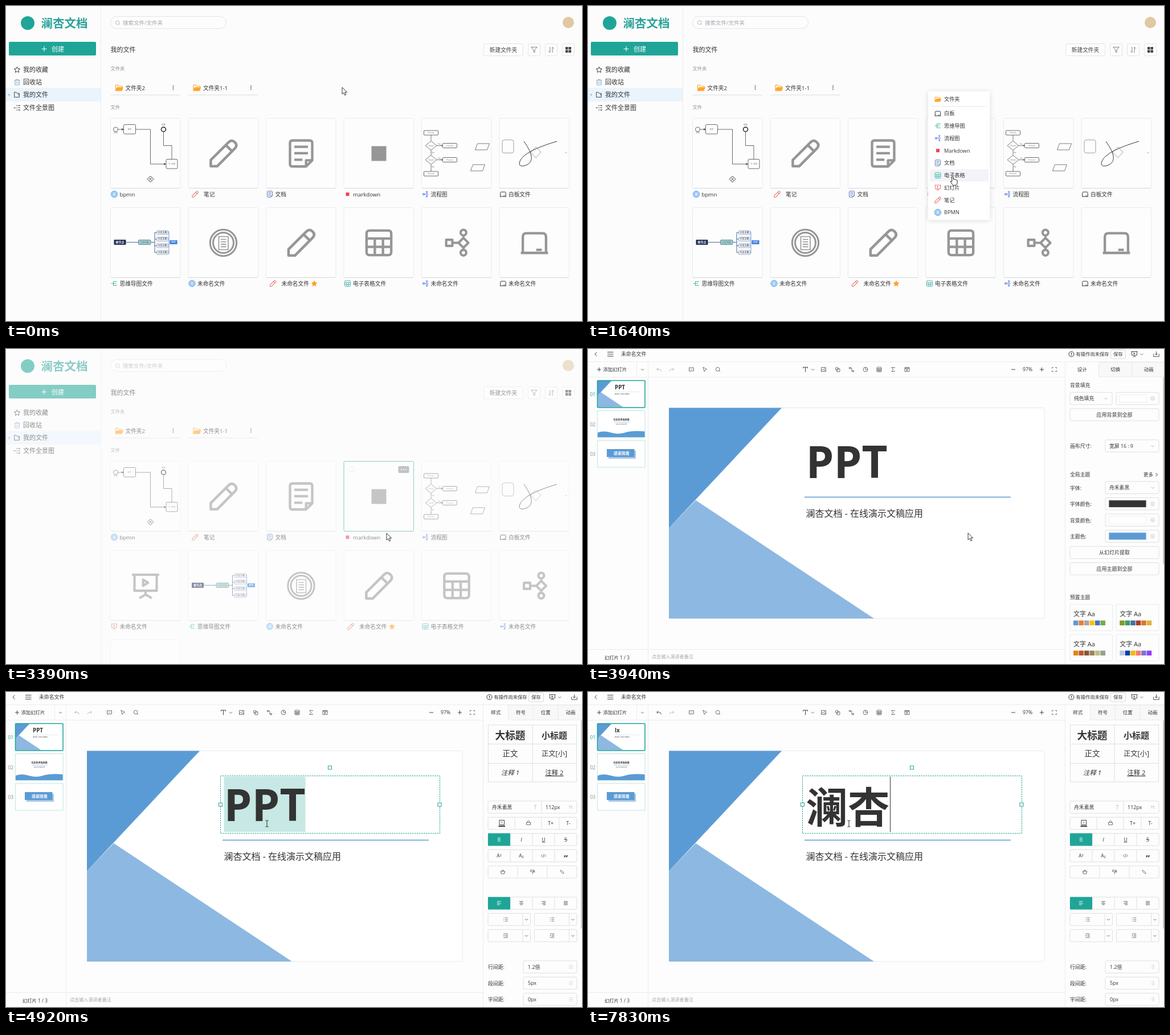
An HTML page that plays this animation: 1011 px wide and 554 px high, repeating every 8 s.

```html
<!DOCTYPE html>
<html lang="zh-CN">
<head>
<meta charset="utf-8">
<title>澜杏文档</title>
<style>
  html, body { margin: 0; width: 100%; height: 100%; overflow: hidden; background: #fcfcfc; }
  svg { display: block; width: 1011px; height: 554px; }
  text { font-family: "Open Sans", "Noto Sans CJK SC", sans-serif; white-space: pre; }
</style>
</head>
<body>
<svg id="stage" viewBox="0 0 1011 554"></svg>
<script>
const TEAL = '#1fa597', INK = '#333', GREY = '#969696', PALE = '#e2e4e8', BLUE = '#5b9bd5';
const LOOP = 8000;

// Drawing helpers: every one returns SVG markup. Text is placed by its vertical centre.
const text = (x, cy, s, size, color = INK, extra = '') =>
  `<text x="${x}" y="${cy + size * .37}" font-size="${size}" fill="${color}" ${extra}>${s}</text>`;
const mid = (x, cy, s, size, color, extra = '') => text(x, cy, s, size, color, 'text-anchor="middle" ' + extra);
const rect = (x, y, w, h, fill = 'none', stroke = 'none', r = 0, extra = '') =>
  `<rect x="${x}" y="${y}" width="${w}" height="${h}" rx="${r}" fill="${fill}" stroke="${stroke}" ${extra}/>`;
const path = (d, stroke = INK, w = 1, fill = 'none', extra = '') =>
  `<path d="${d}" stroke="${stroke}" stroke-width="${w}" fill="${fill}" ${extra}/>`;
const circle = (x, y, r, fill = 'none', stroke = 'none', w = 1) =>
  `<circle cx="${x}" cy="${y}" r="${r}" fill="${fill}" stroke="${stroke}" stroke-width="${w}"/>`;
const move = (x, y, body) => `<g transform="translate(${x} ${y})">${body}</g>`;
const layer = (id, body) => `<g id="${id}">${body}</g>`;
const box = (x, cy, w, h = 21.5) => rect(x, cy - h / 2, w, h, '#fdfdfd', '#dcdfe3', 2);
const chevron = (x, y, c = '#666') => path(`M${x - 2.5} ${y - 1}l2.5 2.5l2.5-2.5`, c, .9);

// Icons live in a 24-unit box: path, colour, line width (0 means filled).
const ring = (x, y, r) => `M${x - r} ${y}a${r} ${r} 0 1 0 ${2 * r} 0a${r} ${r} 0 1 0 ${-2 * r} 0`;
const STAR = 'M12 1.5l3.2 6.8l7.3 1l-5.3 5.2l1.3 7.4L12 18.3l-6.5 3.6l1.3-7.4L1.5 9.3l7.3-1z';
const ICONS = {
  pen: ['M1.8 17.2V22.3H7L21.5 7.7Q23.7 5.2 21.3 2.8T16.5 2.6ZM14 5.1l5 5', '#e57368', 2.1],
  doc: ['M5 1.4H19Q21 1.4 21 3.4V17.5L16 22.5H5Q3 22.5 3 20.5V3.4Q3 1.4 5 1.4ZM6.5 6.5h11M6.5 11.7h11M6.5 17h6.5M16 22V17.5H20.5', '#5b7fb5', 2],
  md: ['M6 6h12v12H6z', '#f04455', 0],
  bpmn: [ring(12, 12, 10.7) + ring(12, 12, 8.3), '#5f9fe4', 1.4],
  table: ['M4.5 2h15q2.5 0 2.5 2.5v15q0 2.500-2.500 2.500h-15q-2.500 0-2.500-2.500v-15q0-2.500 2.500-2.500zM2 8.500h20M2 15.300h20M8.700 8.500V22M15.300 8.500V22', '#4fb8b0', 2],
  flow: ['M3.5 9.5h5v5h-5zM8.5 12h5M17.5 8l4 4l-4 4l-4-4zM17.5 6.600V8M17.500 16v1.400' + ring(17.5, 3.700, 2.300) + ring(17.500, 20, 2.300), '#4a6ef0'],
  board: ['M2.6 20V7.2q0-3 3-3h12.800q3 0 3 3V20M1 20.2h22M13.500 17.700h4.500', '#333', 2],
  mind: ['M1 12h7M9 4v16M9 5h13M9 12h10M9 19h13', '#3dbb85'],
  slide: ['M1 3h22M3 3v13h18V3M12 16v3M7 22l5-3l5 3M10 7v5l4-2.5z', '#e8706a'],
  folder: ['M1 20V5q0-2 2-2h6l2 3h9q2 0 2 2v2h2l-3 10q0 1-2 1H3q-2 0-2-1zM3 15V5h6l2 3h9v2H6z', '#ffa72b', 0],
  star: [STAR, '#222'],
  starFull: [STAR, '#ff9d2e', 0],
  trash: ['M2 5h20M8 5V2h8v3M4 5v17h16V5M9 9v9M15 9v9', '#7fa5c4'],
  dir: ['M2 21V3h7l3 4h8v14zM15 12h5', '#333'],
  tree: ['M0 12h7M10 4h3M10 12h3M10 20h3M16 4h7M16 12h7M16 20h7', '#333', 2.500],
  undo: ['M9 5L3 11l6 6M3 11h11q7 0 7 9', 'currentColor'],
  redo: ['M15 5l6 6l-6 6M21 11H10q-7 0-7 9', '#aaa'],
  note: ['M2 4h20v14H10l-4 3v-3H2zM7 11h2M11 11h2M15 11h2', '#444'],
  pointer: ['M4 2l17 9l-7 3l-4 7z', '#444'],
  search: [ring(11, 11, 8.5) + 'M17 17l5 5', '#444'],
  image: ['M2 3h20v18H2zM2 18l7-7l6 6l3-3l4 4' + ring(16, 8, 1.5), '#444'],
  shapes: ['M9 9h13v13H9z' + ring(9, 9, 6.5), '#444'],
  line: ['M2 3h5v5H2zM17 17h5v5h-5zM7 5.5h6v14h4', '#444'],
  pie: [ring(12, 12, 10) + 'M12 2v10h10', '#444'],
  sigma: ['M19 6V3H5l8 9l-8 9h14v-3', '#444'],
  media: ['M2 3h20v18H2zM2 8h20M8 3v5M16 3v5M10 11v7l5-3.5z', '#444'],
  full: ['M2 8V3h6M16 3h6v5M22 16v5h-6M8 21H2v-5', '#444'],
  save: ['M2 11v10h20V11M12 2v13M7 10l5 5l5-5', '#444'],
  palette: [ring(12, 12, 10) + 'M8 8v2M14 6v2M17 12v2M7 14l6-2v6', '#b5b8bd', 2],
  funnel: ['M2 3h20l-8 9v9l-4-2v-7z', '#555', 1.4],
  sort: ['M8 2v19l-5-5M16 22V3l5 5', '#555', 1.4],
  lock: ['M3 11h18v10H3zM7 11V7q5-8 10 0v4', '#444'],
  eraser: ['M2 9h20v5h-3v7H5v-7H2zM8 9V4h8v5', '#444'],
  brush: ['M3 3h16v7H3zM19 6h3v7H12v9', '#444'],
  link: ['M10 14L4 8q-1-5 4-4l7 7M14 10l6 6q1 5-4 4l-7-7', '#444'],
  code: ['M7 6l-6 6l6 6M17 6l6 6l-6 6M14 4l-4 16', '#444'],
  left: ['M3 4h18M3 9h11M3 14h18M3 19h11', '#444'],
  center: ['M3 4h18M7 9h10M3 14h18M7 19h10', '#444'],
  right: ['M3 4h18M10 9h11M3 14h18M10 19h11', '#444'],
  justify: ['M3 4h18M3 9h18M3 14h18M3 19h18', '#444'],
  list: ['M9 4h13M9 12h13M9 20h13M2 4h3M2 12h3M2 20h3', '#444'],
  indent: ['M2 3h20M11 9h11M11 15h11M2 21h20M2 9l5 3l-5 3', '#444'],
};
function icon(name, x, y, size = 12, color) {
  const [d, own, w = 1.9] = ICONS[name], c = color || own;
  return `<g transform="translate(${x - size / 2} ${y - size / 2}) scale(${size / 24})" stroke-linejoin="round" fill-rule="evenodd">` +
    path(d, w ? c : 'none', w, w ? 'none' : c) + '</g>';
}
const bpmnBadge = (x, y) => circle(x, y, 5.7, '#a9d0f7', '#6eaef0') + rect(x - 2.3, y - 3, 4.6, 6, '#fff', '#5f9fe4', .5, 'stroke-width=".7"') +
  path(`M${x - 1.200} ${y - 1}h2.400m-2.400 2h2.400`, '#5f9fe4', .7);
const fileIcon = (name, x, y) => name === 'bpmn' ? bpmnBadge(x, y) : icon(name, x, y, 12);
const bigIcon = name => icon(name, 61.5, 61.5, 52, GREY) +
  (name === 'bpmn' ? path('M53.5 50.500h16.500v23h-16.500zM57 55.500h9.500m-9.500 4.300h9.500m-9.500 4.300h9.500m-9.500 4.300h9.500', GREY, 1.600) : '');

// ---------- file list ----------
const DARK = '#444';
const tiny = (x, y, s) => mid(x, y, s, 3.2, '#666');
const node = (x, y, w, h, r, s) => rect(x, y, w, h, 'none', DARK, r, 'stroke-width=".8"') + tiny(x + w / 2, y + h / 2, s);
const thumbs = {
  bpmn: circle(9, 19, 4, 'none', DARK, .8) + tiny(9, 25, '开始') + path('M13 19h10M44 19H70V80H97', DARK, .8) +
    path('M20 17.500l3 1.500l-3 1.500zM94 78.500l3 1.500l-3 1.500z', DARK, .5, DARK) + node(23, 10.5, 21, 16.5, 2, '任务') +
    node(97.5, 71.5, 20, 16.5, 2, '下一任务') + path('M107.5 71V47.5H93V24', DARK, .8) +
    circle(93, 19, 4, 'none', '#222', 1.5) + tiny(93, 11, '结束') + path('M70 101l5.5 5.5l-5.5 5.5l-5.5-5.5zM68 104.5l4 4m0-4l-4 4', '#222', .9),
  flow: [[4, 21], [37, 43.5], [37, 68.5], [4, 93]].map(([x, y]) => node(x, y, 25, 8, 1, 'Process')).join('') +
    [47.5, 72.5].map(y => path(`M16.5 ${y - 8}l10 8l-10 8l-10-8zM26.5 ${y}H36M16.5 ${y + 8}v9`, DARK, .7) +
      path(`M34.500 ${y - 1}l2 1l-2 1z`, DARK, .5, DARK) + tiny(16.5, y, 'Check') + tiny(31, y - 3, 'Yes') + tiny(20, y + 12, 'No')).join('') +
    path('M16.5 29v10M16.5 89v4M98 44h21l-4 11h-21zM90 81h21l-4 11h-21z', DARK, .7),
  board: rect(5, 37.5, 20, 23, 'none', '#777', 3.5, 'stroke-width=".7"') + path('M64 50l9 9l-9 10l-9-10z', '#666', .6) +
    path('M43 40C60 64 59 75 49 81C38 86 33 83 36 75C42 60 74 48 101 40', '#333', 1) + circle(117, 60, .7, '#555'),
  mind: path('M27 60.5H49M71 60.5h6.5M82 43.5h-4.5v35H82M77.5 55H82M77.5 66.5H82', '#3b5b86', .9) +
    path('M101 42h1.5v38H101M102.5 60.5H104', '#4a86d8', .8) +
    rect(6, 56, 21, 9, '#1f3056', 'none', 1) + mid(16.5, 60.5, '根节点', 5, '#fff', 'font-weight="700"') +
    rect(49, 56.5, 21.5, 8, '#a4cccd', '#4f8b94', 1.5) + mid(59.7, 60.5, '分支主题', 3.8, '#46727a') +
    [43.5, 55, 66.5, 78.5].map(y => rect(81, y - 3.5, 20, 7, '#eef2f8', '#6f86aa', 1, 'stroke-width=".6"') + mid(91, y, '分支主题', 4, '#334')).join('') +
    rect(104, 57, 13, 7, '#3b7ddd') + mid(110.5, 60.5, '概要', 4, '#fff'),
};
const UNTITLED = '未命名文件';
const files = [
  ['bpmn', 'bpmn', 'bpmn'], ['pen', '笔记'], ['doc', '文档'], ['md', 'markdown'], ['flow', '流程图', 'flow'], ['board', '白板文件', 'board'],
  ['mind', '思维导图文件', 'mind'], ['bpmn', UNTITLED], ['pen', UNTITLED, '', true], ['table', '电子表格文件'], ['flow', UNTITLED], ['board', UNTITLED],
];
function fileCard([name, label, thumb, starred], i) {
  const indent = name === 'pen' ? 27 : 16;
  return move(183.5 + i % 6 * 136.5, 198 + Math.floor(i / 6) * 157,
    rect(0, -.5, 122.5, 123, '#fdfdfd', '#e9ebee', 2) + path('M1 122.5H121.5', '#d3d5d8') +
    (thumb ? thumbs[thumb] : bigIcon(name)) +
    fileIcon(name, name === 'pen' ? 12 : 6.5, 133) + text(indent, 133, label, 9.7) +
    (starred ? icon('starFull', 84.5, 133, 12.5) : ''));
}
const fileGrid = list => list.map(fileCard).join('');
const folderCard = (x, label) => icon('folder', x + 15, 144, 14.5) + text(x + 26, 144, label, 9.7) +
  [140.5, 143.5, 146.5].map(y => circle(x + 110, y, .9, '#555')).join('') + path(`M${x} 156.5h122.5`, '#dcdee1');
const sideRow = (name, y, s) => icon(name, 19.5, y, 11.5) + text(30, y, s, 11);
const tool = x => rect(x, 66.5, 21, 21, '#fdfdfd', PALE, 2);

const listPage =
  path('M166.5 0V554', '#ececee') + circle(38, 30, 12, TEAL) + text(61.5, 30, '澜杏文档', 20.5, '#2aa198', 'font-weight="700"') +
  rect(5, 63, 153, 24, TEAL, 'none', 2) + path('M62.5 75.5h9M67 71v9', '#fff', 1.1) + text(80, 75.5, '创建', 11, '#fff', 'font-weight="500"') +
  rect(0, 144, 166, 24, '#e9f4fd') + path('M4.5 153.5l3 2.7l-3 2.7z', 'none', 0, '#b5bac2') +
  sideRow('star', 112, '我的收藏') + sideRow('trash', 134, '回收站') + sideRow('dir', 156, '我的文件') + sideRow('tree', 179, '文件全景图') +
  rect(183.5, 18.5, 203, 21, '#fdfdfd', PALE, 10.5) + icon('search', 196, 29.5, 9.5, '#a0a3a8') + text(205, 29.5, '搜索文件/文件夹', 9.5, '#a2a5ab') +
  circle(987, 29, 10, '#e0c9a2') + text(183.5, 77, '我的文件', 11) +
  rect(838.5, 66.5, 69, 21, '#fdfdfd', PALE, 2) + mid(873, 77, '新建文件夹', 9.7, '#444') +
  tool(916.5) + tool(946.5) + tool(976.5) + icon('funnel', 927, 77, 12.5) + icon('sort', 957, 77, 12.5) +
  [982, 987.5].map(x => [72, 77.5].map(y => rect(x, y, 4.5, 4.5, '#444')).join('')).join('') +
  text(183.5, 110, '文件夹', 8.3, '#8f9399') + folderCard(183.5, '文件夹2') + folderCard(320, '文件夹1-1') + text(183.5, 178, '文件', 8.3, '#8f9399') +
  layer('gridOld', fileGrid(files)) +
  layer('gridNew', fileGrid([...files.slice(0, 6), ['slide', UNTITLED], ...files.slice(6)])) +
  layer('hover', rect(593, 197.5, 122.5, 123, 'none', '#35a79c', 2) + rect(601.5, 207.5, 9, 8, '#fff', '#dcdfe6', 1) +
    rect(688.5, 206, 19, 12, '#909294', 'none', 2) + [694, 698, 702].map(x => circle(x, 212, 1.1, '#fff')).join(''));

const menuItems = [['folder', '文件夹'], ['board', '白板'], ['mind', '思维导图'], ['flow', '流程图'], ['md', 'Markdown'],
  ['doc', '文档'], ['table', '电子表格'], ['slide', '幻灯片'], ['pen', '笔记'], ['bpmn', 'BPMN']];
const menuY = i => i ? 189 + (i - 1) * 21.75 : 164;
const menu = rect(597, 150, 108.5, 226.5, '#fff', 'none', 3, 'style="filter:drop-shadow(0 1px 4px #0002)"') +
  rect(600, 0, 103, 21.5, '#f2f4f7', 'none', 2, 'id="menuHover"') + path('M603 176.5H699', '#e6e8eb') +
  menuItems.map(([name, s], i) => fileIcon(name, 614, menuY(i)) + text(625, menuY(i), s, 9.2)).join('');

// ---------- slide editor ----------
const slideArt = path('M142 103.5H340L142 315z', 'none', 0, BLUE) + path('M142 315L189 266L502 474H142z', 'none', 0, '#8db8e2') +
  path('M380 260.5H742', BLUE, 1.5) + text(382.5, 289.5, '澜杏文档 - 在线演示文稿应用', 16);
const title = (id, s) => `<text id="${id}" x="382.5" y="227" font-size="78" font-weight="700" fill="${INK}">${s}</text>`;
const thumbFrame = (y, body) => rect(16.5, y, 83.5, 47, '#fff') + body + rect(16.5, y, 83.5, 47, 'none', '#bfe6df');
const editorIcons = [['redo', 147], ['note', 181.5], ['pointer', 205], ['search', 228], ['image', 413.5], ['shapes', 438],
  ['line', 462.5], ['pie', 487], ['table', 511], ['sigma', 535.5], ['media', 560], ['full', 818.5]];
const editorBase = rect(0, 0, 1011, 554, '#fdfdfd') + path('M0 22.5H1011M0 49.5H837M0 528.5H837M105.5 22V554M837.5 22V554M85.5 23V49', '#ebecee') +
  path('M15.5 5.5l-3.5 3.5l3.5 3.5M34 5.5h10.5M34 9h10.5M34 12.5h10.5', '#444') + text(58, 9, UNTITLED, 8.9) +
  circle(848.5, 9, 4.5, 'none', '#333') + path('M848.5 6.5v3.2M848.5 10.7v1', '#333', 1.2) + text(856.5, 9, '有操作尚未保存', 8.3) +
  rect(917.5, 1.5, 26, 15.5, '#fdfdfd', '#d8dadd', 2) + mid(930.5, 9, '保存', 8.3) + icon('slide', 959, 9, 12, '#444') + chevron(972, 9) + icon('save', 997.5, 9, 11.5) +
  path('M16 36h7M19.5 32.5v7M743 36h7M793 36h7M796.5 32.5v7', '#444') + text(26.5, 36, '添加幻灯片', 8.4) + chevron(95.5, 36) +
  layer('undo', icon('undo', 124.5, 36, 10)) + editorIcons.map(([n, x]) => icon(n, x, 36, 9.5, n === 'redo' ? '#aaa' : '#444')).join('') +
  path('M377.5 34v-2h8v2M381.5 32v8.5', '#444') + chevron(394.5, 36) + mid(771.5, 36, '97%', 8.7) +
  ['01', '02', '03'].map((s, i) => text(3.5, 80 + i * 52.5, s, 8.5, i ? '#8a8d92' : TEAL)).join('') +
  thumbFrame(55.5, `<g transform="translate(16.5 55.5) scale(.1267) translate(-142 -103.5)">${slideArt}${title('miniTitle', 'PPT')}</g>`) +
  rect(16.5, 55.5, 83.5, 47.5, 'none', TEAL, 1, 'stroke-width="1.5"') +
  thumbFrame(108.5, mid(58.5, 125, '在此处添加标题', 4, INK, 'font-weight="700"') + path('M45 128.5H73', BLUE, .5) + mid(58.5, 132, '在此处添加副标题', 2.5, '#667') +
    path('M17 147Q27 143 40 147T65 147T100 145V155H17z', 'none', 0, BLUE)) +
  thumbFrame(161, rect(36, 179, 48, 14, '#a9c9e8') + rect(33, 176, 48.5, 14, BLUE) + mid(59, 183.5, '感谢观看', 7, '#fff', 'font-weight="700"')) +
  text(29, 543, '幻灯片 1 / 3', 8.3) + text(112, 541, '点击输入演讲者备注', 8.1, '#a3a6ab') +
  rect(142.5, 103.5, 658.5, 370.5, '#fff', '#e9eaec', 3) + slideArt + rect(382.5, 149, 143, 97, '#c7e8e4', 'none', 0, 'id="selection"') + title('bigTitle', 'PPT');

const tabs = (names, w) => names.map((s, i) => (i ? rect(838 + i * w, 23, w, 26, '#f8f8f9', '#e9eaec') : '') + mid(838 + (i + .5) * w, 36, s, 8.5)).join('');
const label = (y, s) => text(846, y, s, 8.9);
const select = (x, y, w, s) => box(x, y, w) + text(x + 7, y, s, 8.8) + chevron(x + w - 11, y, '#b0b3b8');
const picker = (y, color, x = 908, w = 94) => box(x, y, w) + rect(x + 6, y - 6.5, w - 28, 13, color, '#eee') + icon('palette', 991, y, 8);
const wide = (y, s) => box(846, y, 156) + mid(924, y, s, 9);
const themes = ['#5b9bd5 #ed7d31 #a5a5a5 #ffc000 #4472c4 #70ad47', '#83992a #3c9770 #44709d #a23c33 #d97828 #deb340',
  '#e48312 #bd582c #865640 #9b8357 #c2bc80 #94a088', '#bdc8df #003fa9 #f5ba00 #ff7567 #7676d9 #923ef9'];
const scrollbar = h => rect(1009, 50, 2, h, '#cfd1d4');
const designPanel = tabs(['设计', '切换', '动画'], 58.5) + label(64, '背景填充') + select(846, 87, 74, '纯色填充') + picker(87, '#fff', 927, 75) + wide(115.5, '应用背景到全部') +
  label(171, '画布尺寸:') + select(908, 170.5, 94, '宽屏 16 : 9') + label(221, '全局主题') + text(975, 221, '更多', 8.5) + path('M996.5 218l3 3l-3 3', '#444') +
  label(244.5, '字体:') + select(908, 243.75, 94, '舟禾素黑') +
  [['字体颜色:', INK], ['背景颜色:', '#fff'], ['主题色:', BLUE]].map(([s, c], i) => label(273 + i * 28.5, s) + picker(272.25 + i * 28.5, c)).join('') +
  wide(358, '从幻灯片提取') + wide(386.5, '应用主题到全部') + label(436.5, '预置主题') +
  themes.map((row, i) => move(846 + i % 2 * 81.25, 449 + (i >> 1) * 53, rect(0, 0, 74.5, 46.5, '#fdfdfd', '#e9eaec', 1) + text(6, 17, '文字 Aa', 11) +
    row.split(' ').map((c, k) => rect(6 + k * 9.5, 28.5, 8.5, 8.5, c)).join(''))).join('') + scrollbar(328);

const cells = (y, ...splits) => box(846, y, 156) + splits.map(x => path(`M${x} ${y - 10.75}v21.5`, '#dcdfe3')).join('');
const quarters = [885, 924, 963], slot = i => 865.5 + i * 39;
const active = y => rect(846, y - 11, 39, 22, TEAL, 'none', 1);
const stylePanel = tabs(['样式', '符号', '位置', '动画'], 43.75) + rect(846.5, 58, 155, 100, '#fdfdfd', '#dcdfe3') + path('M846 91.5H1001M846 125.5H1001M924 58V158', '#dcdfe3') +
  mid(885, 76, '大标题', 17.7, INK, 'font-weight="700"') + mid(962.5, 76, '小标题', 15, INK, 'font-weight="700"') + mid(885, 108.5, '正文', 13.5) + mid(962.5, 108.5, '正文[小]', 12.3) +
  mid(885, 142, '注释 1', 11.3, INK, 'font-style="italic"') + mid(962.5, 142, '注释 2', 11.3, INK, 'text-decoration="underline"') +
  cells(202.5, 940) + text(853, 202.5, '舟禾素黑', 8.9) + mid(929, 202.5, 'T', 9, '#b0b3b8') + text(947, 202.5, '112px', 9) + mid(991, 202.5, 'Tt', 8, '#b0b3b8') +
  cells(231, 893, 940, 971) + rect(866, 225.5, 8.5, 8, 'none', '#444') + mid(870.25, 229.5, 'T', 6) + rect(864.5, 235, 11.5, 1.8, '#222') +
  icon('lock', 917, 230, 9.5) + mid(956, 231, 'T+', 9) + mid(987, 231, 'T-', 9) +
  cells(259.5, ...quarters) + active(259.5) + mid(slot(0), 259.5, 'B', 9, '#fff') + mid(slot(1), 259.5, 'I', 9, INK, 'font-style="italic"') +
  mid(slot(2), 259.5, 'U', 8.5, INK, 'text-decoration="underline"') + mid(slot(3), 259.5, 'S', 9, INK, 'text-decoration="line-through"') +
  cells(288, ...quarters) + mid(slot(0), 288, 'A²', 8.5) + mid(slot(1), 288, 'A₂', 8.5) + icon('code', slot(2), 288, 9) + mid(slot(3), 291, '“', 15, INK, 'font-weight="700"') +
  cells(316.5, 898, 950) + icon('eraser', 872, 316.5, 9) + icon('brush', 924, 316.5, 9) + icon('link', 976, 316.5, 9) +
  cells(371.5, ...quarters) + active(371.5) + ['left', 'center', 'right', 'justify'].map((n, i) => icon(n, slot(i), 371.5, 9.5, i ? '' : '#fff')).join('') +
  [['list', 846, 400], ['list', 927.5, 400], ['indent', 846, 428.5], ['indent', 927.5, 428.5]].map(([n, x, y]) =>
    box(x, y, 74.5) + path(`M${x + 61} ${y - 10.5}v21`, '#dcdfe3') + icon(n, x + 31, y, 9) + chevron(x + 67.5, y)).join('') +
  [['行间距:', '1.2倍'], ['段间距:', '5px'], ['字间距:', '0px']].map(([s, v], i) => label(484 + i * 28.5, s) + box(908, 483.5 + i * 28.5, 94) +
    text(916, 483.5 + i * 28.5, v, 8.9) + icon('list', 991, 483.5 + i * 28.5, 8, '#b5b8bd')).join('') + scrollbar(366);

const frameBox = rect(376.5, 147.5, 385, 101, 'none', TEAL, 0, 'stroke-dasharray="2.5 1.5"') +
  [[568.5, 133], [376.5, 198], [761, 198]].map(([x, y]) => rect(x - 3, y - 3, 6, 6, '#fff', TEAL)).join('');
const candidates = rect(312, 252, 291, 53, '#fff', '#d5d7da', 3) + text(321, 266, '', 10, INK, 'id="pinyin"') + text(321, 289, '', 12, INK, 'id="choices"');

const cursors = layer('cursor',
  layer('arrow', path('M0 0V12l2.8-2.5l2 4.5l2-1l-2-4.3h3.7z', '#222', .9, '#fff')) +
  layer('hand', path('M-1.3 8V1Q0-.8 1.3 1V5.5Q3 4.5 3.8 6Q5.5 5.2 6.2 6.7Q8 6.2 8 8.5V11Q8 16 3.5 16H1.5Q-.5 15.5-4 9.5Q-3.5 7.5-1.3 9.5z', '#222', 1, '#fff')) +
  layer('beam', path('M-2.5-5.5h2L0-5l.5-.5h2M0-5V5M-2.5 5.5h2L0 5l.5.5h2', '#222')));

const stage = document.getElementById('stage');
stage.innerHTML = rect(0, 0, 1011, 554, '#fcfcfc') + layer('list', listPage) + layer('menu', menu) +
  layer('editor', editorBase + layer('design', designPanel) + layer('style', stylePanel + frameBox) +
    path('M0 149V246', '#333', 1, 'none', 'id="caret"') + layer('ime', candidates)) + cursors;
const el = Object.fromEntries([...stage.querySelectorAll('[id]')].map(n => [n.id, n]));

// ---------- timeline ----------
const track = [[0, 590, 143], [800, 590, 143], [1200, 611, 192], [1590, 635, 262], [1640, 640, 299], [1720, 648, 326], [1860, 617, 345],
  [2140, 617, 345], [2520, 668, 324], [3940, 668, 324], [4110, 509, 253], [4250, 509, 253], [4650, 458, 231.5], [LOOP, 458, 231.5]];
// time, title, caret x, font size, baseline
const typing = [[0, 'PPT', 0, 78, 227], [6980, 'l', 405, 78, 227], [7350, 'lx', 450, 78, 227], [7780, '澜杏', 530.5, 73.5, 230]];
const show = (id, on) => { el[id].style.display = on ? '' : 'none'; };
function cursorAt(t) {
  const i = track.findIndex(k => k[0] > t), [t0, x0, y0] = track[i - 1], [t1, x1, y1] = track[i];
  const p = (t - t0) / (t1 - t0);
  return [x0 + (x1 - x0) * p, y0 + (y1 - y0) * p];
}
function render(t) {
  const [x, y] = cursorAt(t), menuOpen = t >= 530 && t < 2710, inEditor = t >= 3940;
  const hot = x > 597 ? menuItems.findIndex((_, i) => Math.abs(y - menuY(i)) < 10.9) : -1;
  const overItem = (menuOpen && hot >= 0) || (t >= 2710 && t < 3300);
  const kind = inEditor && t >= 4110 && y < 248 ? 'beam' : overItem ? 'hand' : 'arrow';
  el.cursor.setAttribute('transform', `translate(${x} ${y})`);
  for (const k of ['arrow', 'hand', 'beam']) show(k, k === kind);

  show('list', !inEditor);
  el.list.style.opacity = Math.min(1, Math.max(0, 1 - (t - 3300) / 200));
  show('gridOld', t < 2880);
  show('gridNew', t >= 2880);
  show('hover', t >= 2710);
  show('menu', menuOpen);
  show('menuHover', hot >= 0);
  if (hot >= 0) el.menuHover.setAttribute('y', menuY(hot) - 10.75);

  show('editor', inEditor);
  show('design', t < 4810);
  show('style', t >= 4810);
  show('selection', t >= 4920 && t < 6980);
  const [, typed, caretX, size, baseline] = typing.findLast(k => k[0] <= t);
  el.bigTitle.textContent = typed;
  el.bigTitle.setAttribute('font-size', size);
  el.bigTitle.setAttribute('y', baseline);
  el.caret.setAttribute('transform', `translate(${caretX} 0)`);
  show('caret', caretX > 0);
  show('ime', t >= 7010 && t < 7780);
  el.pinyin.textContent = typed === 'lx' ? "l'x" : 'l';
  el.choices.textContent = typed === 'lx' ? '1 澜杏   2 类型   3 联系   4 练习' : '1 了   2 来   3 里   4 两   5 老';
  const saved = t >= 7650;
  el.miniTitle.textContent = saved ? 'lx' : 'PPT';
  el.undo.style.color = saved ? '#333' : '#aaa';
}
(function tick() {
  render(performance.now() % LOOP);
  requestAnimationFrame(tick);
})();
</script>
</body>
</html>
```
